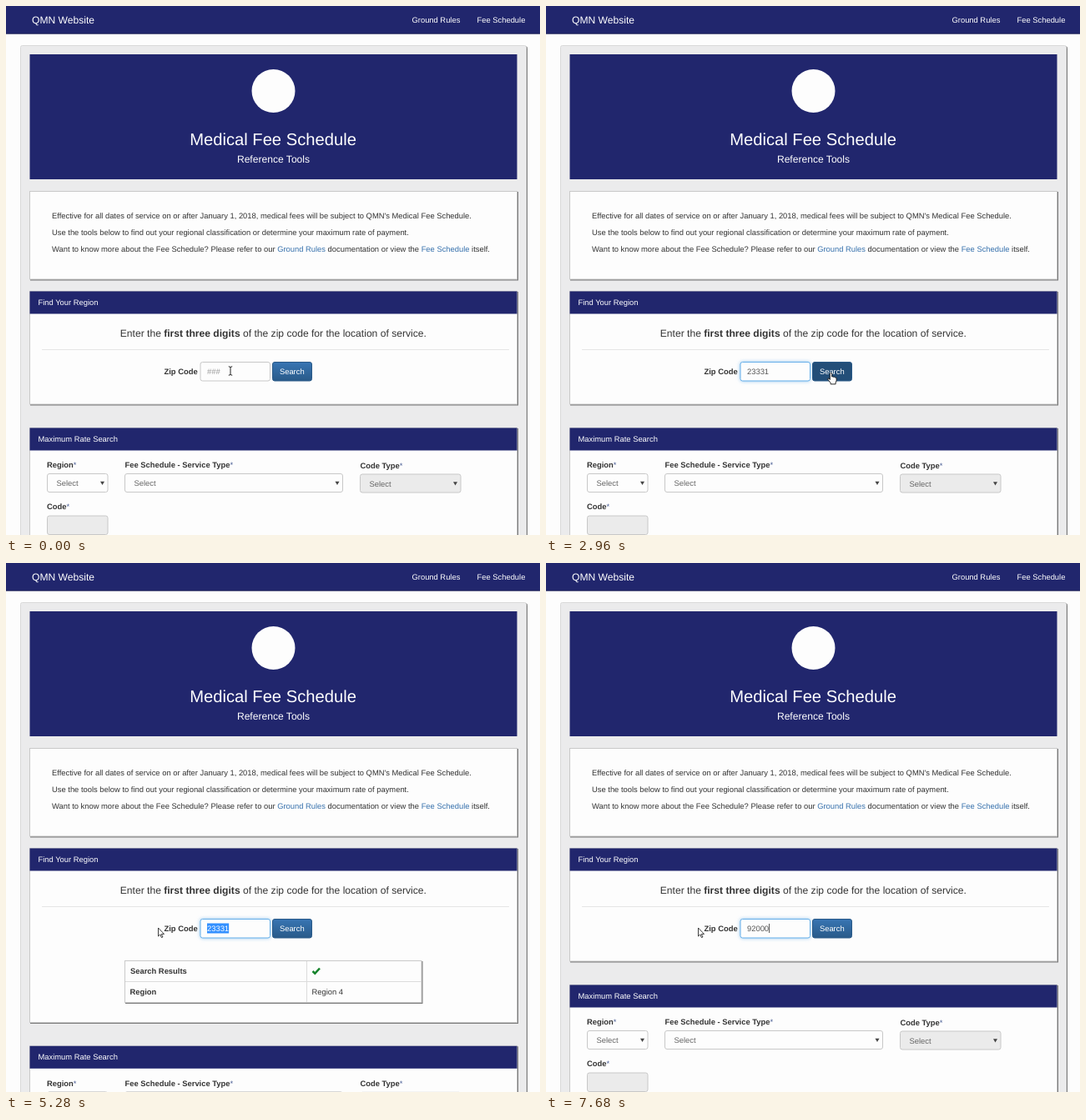
Animation of 640 by 635 pixels, one loop 8000 ms. Source, as an HTML page:

```html
<!DOCTYPE html>
<html lang="en">
<head>
<meta charset="utf-8">
<title>Medical Fee Schedule</title>
<style>
  html, body { margin: 0; width: 100%; height: 100%; overflow: hidden; background: #fdfdfd; }
  svg { display: block; width: 640px; height: 635px; }
  text { font: 9.4px "Liberation Sans", Arial, sans-serif; fill: #333; white-space: pre; text-rendering: geometricPrecision; }
  .light { fill: #fff; }
  .lead { font-size: 12.1px; }
  .title { font-size: 20.2px; }
  .mid { text-anchor: middle; }
  .bold { font-weight: bold; }
  .link { fill: #3872ad; }
  .soft { fill: #666; }
  .star { fill: #4b5f96; font-weight: normal; }
  .navy { fill: #21266d; }
  .box { fill: #fdfdfd; stroke: #c9c9c9; filter: drop-shadow(1.4px 1.4px .6px #777); }
  .field { fill: #fdfdfd; stroke: #c8c8c8; }
  .off { fill: #ebebeb; }
  .focus { stroke: #66afe9; filter: drop-shadow(0 0 2px rgba(102, 175, 233, .7)); }
  .rule { stroke: #e6e6e6; }
</style>
</head>
<body>
<svg viewBox="0 0 640 635">
  <defs>
    <linearGradient id="plain" x2="0" y2="1">
      <stop stop-color="#3875b3"/><stop offset="1" stop-color="#295a89"/>
    </linearGradient>
    <linearGradient id="pressed" x2="0" y2="1">
      <stop stop-color="#306ba3"/><stop offset="1" stop-color="#295584"/>
    </linearGradient>
  </defs>

  <rect class="navy" width="640" height="33"/>
  <path d="M0 33.2H640" stroke="#151a50"/>
  <text class="light lead" x="31" y="21">QMN Website</text>
  <text class="light" x="486.5" y="20">Ground Rules</text>
  <text class="light" x="564.5" y="20">Fee Schedule</text>

  <rect class="box" x="17.5" y="47.5" width="606" height="620" rx="2" style="fill:#ebebec;stroke:#d9d9d9"/>

  <rect class="navy" x="28.5" y="58" width="584" height="150"/>
  <circle cx="320.5" cy="102" r="26" fill="#fdfdfd"/>
  <text class="light title mid" x="320" y="167.3">Medical Fee Schedule</text>
  <text class="light lead mid" x="320.5" y="188.3">Reference Tools</text>

  <rect class="box" x="28.5" y="222.5" width="584" height="105.5"/>
  <text x="55" y="255">Effective for all dates of service on or after January 1, 2018, medical fees will be subject to QMN's Medical Fee Schedule.</text>
  <text x="55" y="275">Use the tools below to find out your regional classification or determine your maximum rate of payment.</text>
  <text x="55" y="295.3">Want to know more about the Fee Schedule? Please refer to our <tspan class="link">Ground Rules</tspan> documentation or view the <tspan class="link">Fee Schedule</tspan> itself.</text>

  <rect id="panel" class="box" x="28.5" y="342.5" width="584" height="135.5"/>
  <rect class="navy" x="28.5" y="342.5" width="584" height="27"/>
  <text class="light" x="38.5" y="359.2">Find Your Region</text>
  <text class="lead mid" x="320.3" y="397">Enter the <tspan class="bold">first three digits</tspan> of the zip code for the location of service.</text>
  <path class="rule" d="M43 412.5H603"/>
  <text class="bold" x="189.5" y="442">Zip Code</text>
  <rect id="input" class="field" x="233" y="427.5" width="83.5" height="22.5" rx="2.5"/>
  <rect id="mark" y="432.5" height="12" fill="#3390ff"/>
  <text id="value" x="241" y="442"></text>
  <path id="caret" d="M0 433V444" stroke="#333" stroke-width=".8"/>
  <rect id="button" x="319.5" y="427.5" width="47" height="22.5" rx="2.5"/>
  <text class="light mid" x="342.8" y="442">Search</text>

  <g id="results">
    <rect class="box" x="142.5" y="477.5" width="355.5" height="50"/>
    <path d="M143 502.5H498M360.5 478V527" stroke="#dcdcdc"/>
    <text class="bold" x="149" y="493.3">Search Results</text>
    <text class="bold" x="148.5" y="518">Region</text>
    <text x="366.5" y="518">Region 4</text>
    <path id="tick" d="M367.5 490L370.3 492.7L376 486.5" fill="none" stroke="#15832b" stroke-width="2.5"/>
  </g>

  <g id="rates">
    <rect class="box" x="28.5" y="506.5" width="584" height="240"/>
    <rect class="navy" x="28.5" y="506.5" width="584" height="27"/>
    <text class="light" x="38.5" y="523.2">Maximum Rate Search</text>
    <text class="bold" x="49" y="554.3">Region<tspan class="star">*</tspan></text>
    <text class="bold" x="142.5" y="554.3">Fee Schedule - Service Type<tspan class="star">*</tspan></text>
    <text class="bold" x="424.5" y="554.8">Code Type<tspan class="star">*</tspan></text>
    <text class="bold" x="49" y="604.3">Code<tspan class="star">*</tspan></text>
    <rect class="field off" x="49.5" y="612" width="72.5" height="22.5" rx="2.5"/>
  </g>

  <g id="cursor">
    <path id="beam" d="M-2.2-5.2Q0-5.2 0-4Q0-5.2 2.2-5.2M0-4V4M-2.2 5.2Q0 5.2 0 4Q0 5.2 2.2 5.2" fill="none" stroke="#222"/>
    <path id="hand" d="M-1.2.6Q0-.8 1.2.6V4.6Q2.4 3.8 3.2 4.9Q4.3 4.3 5 5.4Q6.6 5 6.6 6.6V9.4L5.6 11.6V13.4H-.4V12L-3.8 7.6Q-3.8 6-2.4 6.6L-1.2 8Z" fill="#fff" stroke="#111" stroke-width=".9"/>
    <path id="arrow" d="M0 0V10L2.3 7.9L3.9 11.6L5.4 11L3.8 7.4H7Z" fill="#fff" stroke="#111" stroke-width=".8"/>
  </g>
</svg>
<script>
  const LOOP = 8000, STEP = 80, LEFT = 241, DIGIT = 9.4 * .556;
  const $ = id => document.getElementById(id);
  const show = (id, on) => $(id).style.display = on ? '' : 'none';
  const within = (t, a, b) => t >= a && t < b;

  // time, field content
  const typing = [[0, ''], [1200, '2'], [1520, '23'], [1600, '233'], [2000, '2333'], [2160, '23331'],
    [5680, ''], [6400, '9'], [6720, '92'], [6880, '920'], [7360, '9200'], [7520, '92000']];

  // time, x, y of the pointer
  const path = [[0, 269, 438], [2320, 269, 438], [2800, 341.5, 440.5], [3840, 341.5, 440.5],
    [4320, 289, 438], [4400, 289, 438], [4720, 182.5, 438], [LOOP, 182.5, 438]];

  function addSelect(x, y, width, off) {
    $('rates').insertAdjacentHTML('beforeend',
      `<rect class="field ${off ? 'off' : ''}" x="${x}" y="${y}" width="${width}" height="22" rx="2.5"/>
       <text class="soft" x="${x + 11}" y="${y + 14.5}">Select</text>
       <path d="M${x + width - 9} ${y + 9.2}h5l-2.5 4.4z" fill="#444"/>`);
  }
  addSelect(49.5, 561.5, 72.5);
  addSelect(142.5, 561.5, 261);
  addSelect(424.5, 562, 120.5, true);

  function pointer(t) {
    const i = path.findIndex(p => p[0] > t);
    const [t0, x0, y0] = path[i - 1], [t1, x1, y1] = path[i];
    const u = (t - t0) / (t1 - t0), e = u * u * (3 - 2 * u);
    return [x0 + (x1 - x0) * e, y0 + (y1 - y0) * e];
  }

  function draw(t) {
    const [x, y] = pointer(t);
    const value = typing.filter(s => s[0] <= t).pop()[1];
    const end = LEFT + value.length * DIGIT;

    const over = x > 319, outside = x < 190;
    $('cursor').setAttribute('transform', `translate(${x} ${y})`);
    show('hand', over);
    show('arrow', outside);
    show('beam', !over && !outside);

    const focused = within(t, 720, 3040) || t >= 4480;
    $('input').setAttribute('class', focused ? 'field focus' : 'field');

    const selecting = within(t, 4480, 5680);
    const from = LEFT + Math.round(Math.max(0, x - LEFT) / DIGIT) * DIGIT;
    $('mark').setAttribute('x', from);
    $('mark').setAttribute('width', selecting ? Math.max(0, end - from) : 0);
    const marked = selecting && from < end;
    $('value').textContent = value || '###';
    $('value').style.fill = marked ? '#fff' : value ? '#555' : '#999';

    show('caret', within(t, 720, 2640) || t >= 5680);
    $('caret').setAttribute('transform', `translate(${end + .4} 0)`);

    const down = within(t, 2880, 3040), active = within(t, 3040, 4480);
    $('button').style.fill = down ? '#234e78' : active ? 'url(#pressed)' : over ? '#265a88' : 'url(#plain)';
    $('button').style.stroke = active ? '#4f86c2' : '#2a5a88';

    const found = within(t, 3040, 5680);
    show('results', found);
    show('tick', t >= 3120);
    $('panel').setAttribute('height', found ? 209 : 135.5);
    $('rates').setAttribute('transform', `translate(0 ${found ? 73.3 : 0})`);
  }

  const start = performance.now();
  function tick(now) {
    const t = Math.max(0, now - start) % LOOP;
    draw(Math.floor(t / STEP) * STEP);
    requestAnimationFrame(tick);
  }
  draw(0);
  requestAnimationFrame(tick);
</script>
</body>
</html>
```
